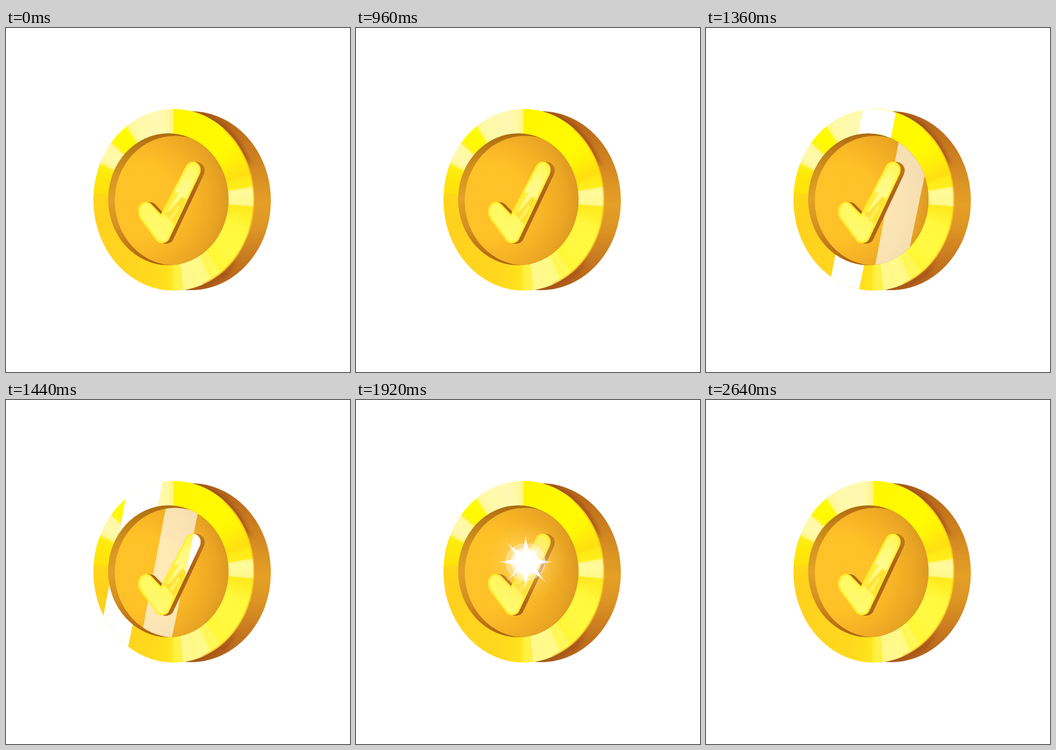
An HTML page with a canvas for the animation above (3.36 s loop, 748 by 748 pixels).

```html
<!DOCTYPE html>
<html lang="en">
<head>
<meta charset="utf-8">
<title>Gold coin</title>
<style>
  html, body { margin: 0; width: 100%; height: 100%; overflow: hidden; background: #fff; }
  canvas { display: block; }
</style>
</head>
<body>
<canvas id="stage" width="748" height="748"></canvas>
<script>
const SIZE = 748, LOOP = 3360, STEP = 80;
const TAU = Math.PI * 2;
const stage = document.getElementById('stage').getContext('2d');

const ellipse = (x, y, rx, ry) => {
  const path = new Path2D();
  path.ellipse(x, y, rx, ry, 0, 0, TAU);
  return path;
};

const face = ellipse(365, 373.5, 175, 197.5);
const back = ellipse(402, 375.5, 174, 194.5);
const recess = ellipse(353, 372.5, 131, 143.5);
const floor = ellipse(367.5, 375.5, 131, 141);
const check = new Path2D('M337 405L391 301C397 289 410 288 417 295C424 301 425 310 420 320' +
  'L354 460C349 469 334 471 327 462L292 415C286 405 286 393 291 386C297 377 308 376 315 382Z');

const rim = new Path2D();
rim.ellipse(364, 373.5, 173.8, 197, 0, 0, TAU);
rim.closePath();
rim.addPath(recess);

// Stops are [position, color] pairs; scale converts positions to 0..1.
function withStops(gradient, stops, scale = 1) {
  for (const [at, color] of stops) gradient.addColorStop(at / scale, color);
  return gradient;
}

function clipped(c, paths, draw) {
  c.save();
  for (const path of paths) c.clip(path, path === rim ? 'evenodd' : 'nonzero');
  draw();
  c.restore();
}

function polygon(c, points, color, blur = 0) {
  c.save();
  c.filter = blur ? `blur(${blur}px)` : 'none';
  c.fillStyle = color;
  c.beginPath();
  points.forEach(([x, y]) => c.lineTo(x, y));
  c.fill();
  c.restore();
}

function drawSide(c) {
  c.fillStyle = withStops(c.createLinearGradient(0, 181, 0, 571), [
    [0, '#b0641a'], [0.12, '#c0701c'], [0.25, '#cd8120'], [0.4, '#dc9423'], [0.52, '#e5a025'],
    [0.66, '#dc9423'], [0.82, '#c87a20'], [0.93, '#bb691c'], [1, '#b0601a']
  ]);
  c.fill(back);
  clipped(c, [back], () => {
    polygon(c, [[405, 178], [440, 186], [478, 210], [510, 250], [535, 300], [490, 260], [425, 190]], '#a3551a', 4);
    polygon(c, [[385, 575], [420, 560], [475, 530], [505, 500], [480, 540], [430, 566]], '#a3531a', 4);
  });
}

function drawRim(c) {
  c.fillStyle = withStops(c.createConicGradient(-Math.PI / 2, 365, 373.5), [
    [0, '#fff600'], [40, '#fffb00'], [52, '#fff506'], [64, '#ffe60e'], [71, '#ffdf12'],
    [72.2, '#ffe914'], [80, '#ffee1c'], [81, '#fff884'], [84, '#fffa9c'], [94, '#fff98c'],
    [95.5, '#ffe91c'], [104, '#fff12a'], [112, '#fff83c'], [132, '#fff942'], [146, '#fff735'],
    [150, '#fff862'], [153, '#fff64a'], [157, '#fffa88'], [173.5, '#fff98c'], [174.5, '#fff04a'],
    [179, '#fff242'], [182, '#ffe522'], [187, '#ffdf1c'], [195, '#ffd91d'], [220, '#ffd41e'],
    [255, '#ffd11d'], [274, '#ffd719'], [275, '#ffe20e'], [288, '#ffe80a'], [295, '#ffed12'],
    [297.5, '#fff894'], [302, '#fff9ac'], [311, '#fff9a4'], [313, '#fff420'], [316, '#fff900'],
    [326, '#fffb04'], [328.5, '#fff89a'], [334, '#fff9aa'], [350, '#fff9b2'], [358, '#fff89a'],
    [359.4, '#fff88c'], [360, '#fff600']
  ], 360);
  c.fill(face);
  clipped(c, [face], () => {
    polygon(c, [[355, 170], [363, 170], [363, 235], [355, 235]], '#fff57066', 1);
    c.strokeStyle = '#f3b41a';
    c.lineWidth = 4;
    c.filter = 'blur(1px)';
    c.beginPath();
    c.ellipse(365, 373.5, 175, 197.5, 0, -0.9, 1.2);
    c.stroke();
  });
}

function drawRecess(c) {
  c.fillStyle = withStops(c.createLinearGradient(0, 229, 0, 516), [
    [0, '#ad6c10'], [0.1, '#bc7a16'], [0.28, '#d2921f'], [0.5, '#e2a127'],
    [0.72, '#d38f20'], [0.88, '#bd7415'], [1, '#a9640f']
  ]);
  c.fill(recess);
  clipped(c, [recess], () => {
    c.fillStyle = withStops(c.createRadialGradient(285, 375, 0, 285, 375, 225), [
      [0, '#ffc229'], [0.36, '#ffc128'], [0.55, '#f7b526'], [0.75, '#eba723'], [0.9, '#dc9821'], [1, '#d59020']
    ]);
    c.fill(floor);
  });
}

function drawCheck(c) {
  c.fillStyle = withStops(c.createLinearGradient(0, 290, 0, 470), [
    [0, '#c27a1c'], [0.4, '#ad611a'], [1, '#b0671a']
  ]);
  for (let dx = 9; dx > 0; dx--) {
    c.save();
    c.translate(dx, dx / 9);
    c.fill(check);
    c.restore();
  }
  c.fillStyle = withStops(c.createLinearGradient(400, 295, 320, 465), [
    [0, '#fff65a'], [0.2, '#fffa80'], [0.42, '#fffb92'], [0.7, '#fff962'], [1, '#fffa76']
  ]);
  c.fill(check);
  clipped(c, [check], () => {
    polygon(c, [[360, 358], [376, 358], [350, 401], [334, 405]], '#ffed42', 1);
    polygon(c, [[384, 366], [398, 380], [370, 432], [342, 402], [355, 399]], '#ffe136', 1.5);
    polygon(c, [[374, 385], [379, 389], [360, 418], [355, 413]], '#fff25c', 1);
    c.strokeStyle = '#fff01e';
    c.lineWidth = 7;
    c.filter = 'blur(1px)';
    c.stroke(check);
  });
}

function makeCoin() {
  const layer = document.createElement('canvas');
  layer.width = layer.height = SIZE;
  const c = layer.getContext('2d');
  c.fillStyle = '#fff';
  c.fillRect(0, 0, SIZE, SIZE);
  drawSide(c);
  drawRim(c);
  drawRecess(c);
  return layer;
}

function makeCheck() {
  const layer = document.createElement('canvas');
  layer.width = layer.height = SIZE;
  drawCheck(layer.getContext('2d'));
  return layer;
}

const coinLayer = makeCoin(), checkLayer = makeCheck();

// x is the left edge of the slanted band at y = 400.
function drawBand(paths, x, color) {
  const left = y => x - 0.19 * (y - 400);
  const right = y => x + 69 - 0.209 * (y - 400);
  clipped(stage, paths, () => polygon(stage,
    [[left(150), 150], [right(150), 150], [right(600), 600], [left(600), 600]], color));
}

const lerp = (a, b, k) => a + (b - a) * k;

// Interpolates [time, value] keys.
function track(keys, t) {
  if (t <= keys[0][0]) return keys[0][1];
  for (let i = 1; i < keys.length; i++) {
    const [t0, a] = keys[i - 1], [t1, b] = keys[i];
    if (t <= t1) return lerp(a, b, (t - t0) / (t1 - t0));
  }
  return keys[keys.length - 1][1];
}

const sparkle = {
  cross: [[1760, 0], [1840, 30], [1920, 62], [2000, 48], [2160, 0]],
  diagonal: [[1760, 0], [1920, 0.5], [2080, 0.8], [2240, 1], [2320, 0.85], [2640, 0]],
  core: [[1760, 0], [1840, 20], [1920, 40], [2080, 30], [2240, 24], [2320, 21], [2640, 0]],
  ring: [[1760, 0], [1840, 24], [1920, 41], [2080, 50]],
  ringAlpha: [[1760, 0], [1840, 0.6], [1920, 0.75], [2080, 0]],
  halo: [[1760, 0], [1920, 88], [2240, 68], [2640, 0]]
};

function drawRay(angle, length, width, alpha = 1) {
  if (length <= 0) return;
  stage.save();
  stage.rotate(angle);
  stage.globalAlpha = alpha;
  stage.fillStyle = withStops(stage.createLinearGradient(0, 0, length, 0), [
    [0, '#fff'], [0.6, 'rgba(255,255,255,.95)'], [1, 'rgba(255,255,255,.25)']
  ]);
  stage.beginPath();
  stage.moveTo(0, -width);
  stage.quadraticCurveTo(length * 0.22, -width * 0.25, length, 0);
  stage.quadraticCurveTo(length * 0.22, width * 0.25, 0, width);
  stage.fill();
  stage.restore();
}

function drawGlow(radius, stops) {
  stage.fillStyle = withStops(stage.createRadialGradient(0, 0, 0, 0, 0, radius), stops);
  stage.beginPath();
  stage.arc(0, 0, radius, 0, TAU);
  stage.fill();
}

function drawSparkle(t) {
  const now = {};
  for (const name in sparkle) now[name] = track(sparkle[name], t);
  const { cross, diagonal, core, ring, ringAlpha, halo } = now;
  if (core <= 0) return;
  const quarter = Math.PI / 4;

  stage.save();
  stage.translate(369, 352);
  drawGlow(halo, [
    [0, 'rgba(255,240,190,.75)'], [0.4, 'rgba(255,220,130,.4)'], [1, 'rgba(255,205,90,0)']
  ]);
  if (ringAlpha > 0) {
    stage.save();
    stage.globalAlpha = ringAlpha;
    stage.strokeStyle = withStops(stage.createLinearGradient(-ring, 0, ring, 0), [
      [0, '#fff'], [0.5, 'rgba(255,255,255,.55)'], [1, '#fff']
    ]);
    stage.lineWidth = 1.8;
    stage.shadowColor = '#fff';
    stage.shadowBlur = 5;
    stage.beginPath();
    stage.ellipse(0, 0, ring, ring * 0.95, 0, 0, TAU);
    stage.stroke();
    stage.restore();
  }
  drawGlow(core, [
    [0, '#fff'], [0.5, '#fff'], [0.72, 'rgba(255,255,255,.72)'], [1, 'rgba(255,255,255,0)']
  ]);
  const width = core * 0.42;
  drawRay(5 * quarter, 124 * diagonal, width);
  drawRay(quarter, 129 * diagonal, width);
  drawRay(7 * quarter, 101 * diagonal, width * 0.7, 0.75);
  drawRay(3 * quarter, 62 * Math.min(1, diagonal * 2), width * 0.7, 0.8);
  for (let i = 0; i < 4; i++) drawRay(i * 2 * quarter, cross, cross * 0.3);
  stage.restore();
}

function render(t) {
  stage.drawImage(coinLayer, 0, 0);
  const sweep = 225 - (t - 1440) * 0.925;
  const sweeping = t >= 720 && t < 1840;
  if (sweeping) {
    drawBand([rim], sweep, '#fff');
    drawBand([recess, floor], sweep + 91, 'rgba(255,255,255,.65)');
  }
  stage.drawImage(checkLayer, 0, 0);
  if (sweeping) drawBand([check], sweep + 162, '#fff');
  drawSparkle(t);
}

const start = performance.now();
function tick() {
  const t = (performance.now() - start) % LOOP;
  render(Math.floor(t / STEP) * STEP);
  requestAnimationFrame(tick);
}
tick();
</script>
</body>
</html>
```
